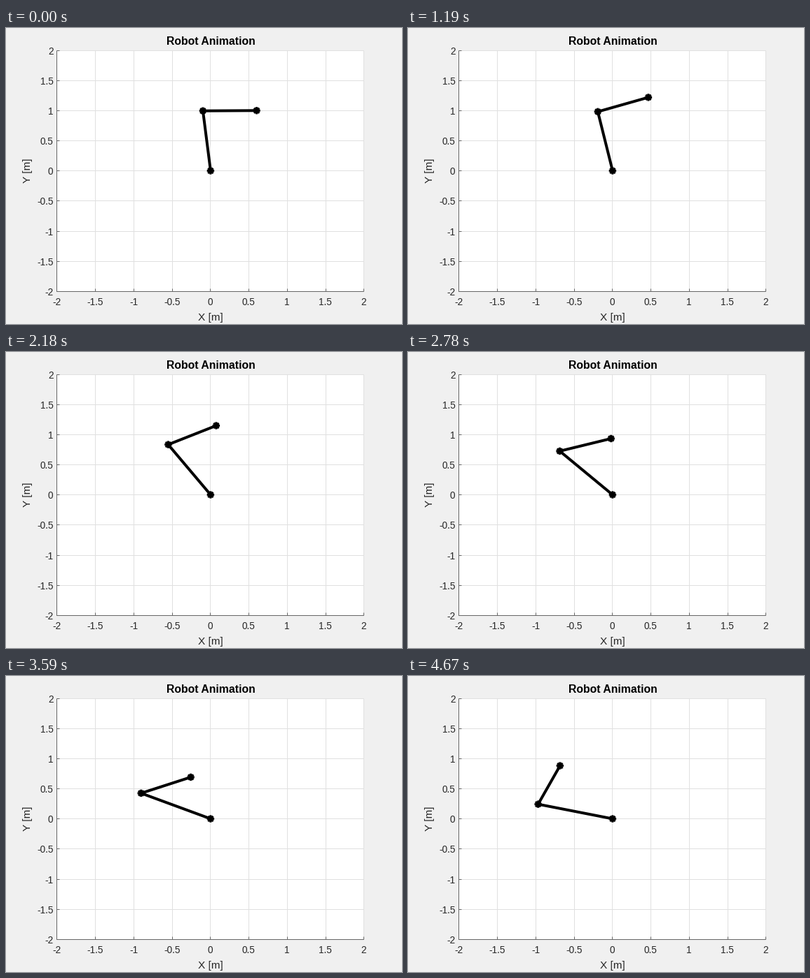
A matplotlib script for the animation above (4.7 s loop, 565 by 424 pixels).

```python
import numpy as np
import matplotlib.pyplot as plt
from matplotlib.animation import FuncAnimation
from matplotlib.patches import Rectangle

W, H = 565, 424
DPI = 64
PT = 72 / DPI                      # points per pixel
LEFT, RIGHT, TOP, BOTTOM = 72.45, 510.45, 31.8, 376.8
SX, SY = (RIGHT - LEFT) / 4, (BOTTOM - TOP) / 4
OX, OY = 291.9, 204.5              # arm base in pixels
L1, L2 = 1.0, 0.7                  # link lengths
INK, AXIS, GRID = "#262626", "#666666", "#e0e0e0"

# Path of the arm's tip: step, x, y
PATH = np.array([
    (0, 0.600, 1.000), (18, 0.515, 1.175), (24, 0.466, 1.219),
    (36, 0.334, 1.250), (57, 0.073, 1.148), (77, -0.020, 0.933),
    (92, -0.125, 0.742), (108, -0.306, 0.690), (126, -0.527, 0.777),
    (140, -0.685, 0.881),
])
STEPS, TIPS = PATH[:, 0], PATH[:, 1:]
SLOPES = np.gradient(TIPS, STEPS, axis=0, edge_order=2)

# Eight-spoked joint marker: four strokes, separated by gaps
angles = np.arange(4) * np.pi / 4
SPOKES = 5.2 * np.outer([-1, 1, np.nan], np.exp(1j * angles)).T.ravel()


def tip_at(step):
    """Cubic Hermite interpolation along the path."""
    i = min(np.searchsorted(STEPS, step, side="right") - 1, len(STEPS) - 2)
    h = STEPS[i + 1] - STEPS[i]
    u = (step - STEPS[i]) / h
    return ((1 + 2 * u) * (1 - u) ** 2 * TIPS[i]
            + u * (1 - u) ** 2 * h * SLOPES[i]
            + u * u * (3 - 2 * u) * TIPS[i + 1]
            + u * u * (u - 1) * h * SLOPES[i + 1])


def elbow_for(x, y):
    """Inverse kinematics of the two links, elbow to the left."""
    r = np.hypot(x, y)
    inner = np.arccos((L1 ** 2 + r ** 2 - L2 ** 2) / (2 * L1 * r))
    angle = np.arctan2(y, x) + inner
    return L1 * np.cos(angle), L1 * np.sin(angle)


def label(x, y, text, size, color=INK, ha="center", **kw):
    ax.text(x, y, text, fontsize=size * PT, family="Liberation Sans",
            color=color, ha=ha, va="baseline", **kw)


fig = plt.figure(figsize=(W / DPI, H / DPI), dpi=DPI, facecolor="#f0f0f0")
ax = fig.add_axes([0, 0, 1, 1])
ax.axis("off")
ax.add_patch(Rectangle((LEFT, TOP), RIGHT - LEFT, BOTTOM - TOP,
                       fc="white", lw=0))

# Grid, axis lines and inward ticks
values = np.linspace(-2, 2, 9)
xs = np.linspace(LEFT, RIGHT, 9)
ys = np.linspace(BOTTOM, TOP, 9)
ax.vlines(xs, TOP, BOTTOM, colors=GRID, lw=PT)
ax.hlines(ys, LEFT, RIGHT, colors=GRID, lw=PT)
ax.vlines(LEFT, TOP, BOTTOM, colors=AXIS, lw=PT)
ax.hlines(BOTTOM, LEFT, RIGHT, colors=AXIS, lw=PT)
ax.vlines(xs, BOTTOM - 4, BOTTOM, colors=AXIS, lw=PT)
ax.hlines(ys, LEFT, LEFT + 4, colors=AXIS, lw=PT)

for v, x, y in zip(values, xs, ys):
    label(x, 397.3, f"{v:g}", 13.6)
    label(67.5, y + 6, f"{v:g}", 13.6, ha="right")
label(292, 24, "Robot Animation", 15.7, color="black", weight="bold")
label(291.7, 419, "X [m]", 15.4)
label(35.2, 204.3, "Y [m]", 15.4, rotation=90, rotation_mode="anchor")

arm, = ax.plot([], [], color="black", lw=4 * PT, solid_joinstyle="round",
               solid_capstyle="butt")
joints, = ax.plot([], [], color="black", lw=3 * PT, solid_capstyle="butt")
ax.set_xlim(0, W)
ax.set_ylim(H, 0)


def draw(frame):
    ms = frame * 10
    step = 0 if ms < 500 else (ms - 500) // 30 + 1
    x, y = tip_at(step)
    ex, ey = elbow_for(x, y)
    px = OX + SX * np.array([0, ex, x])
    py = OY - SY * np.array([0, ey, y])
    arm.set_data(px, py)
    stars = np.add.outer(px + 1j * py, SPOKES).ravel()
    joints.set_data(stars.real, stars.imag)
    return arm, joints


anim = FuncAnimation(fig, draw, frames=470, interval=10, repeat=True,
                     repeat_delay=0)
plt.show()
```
